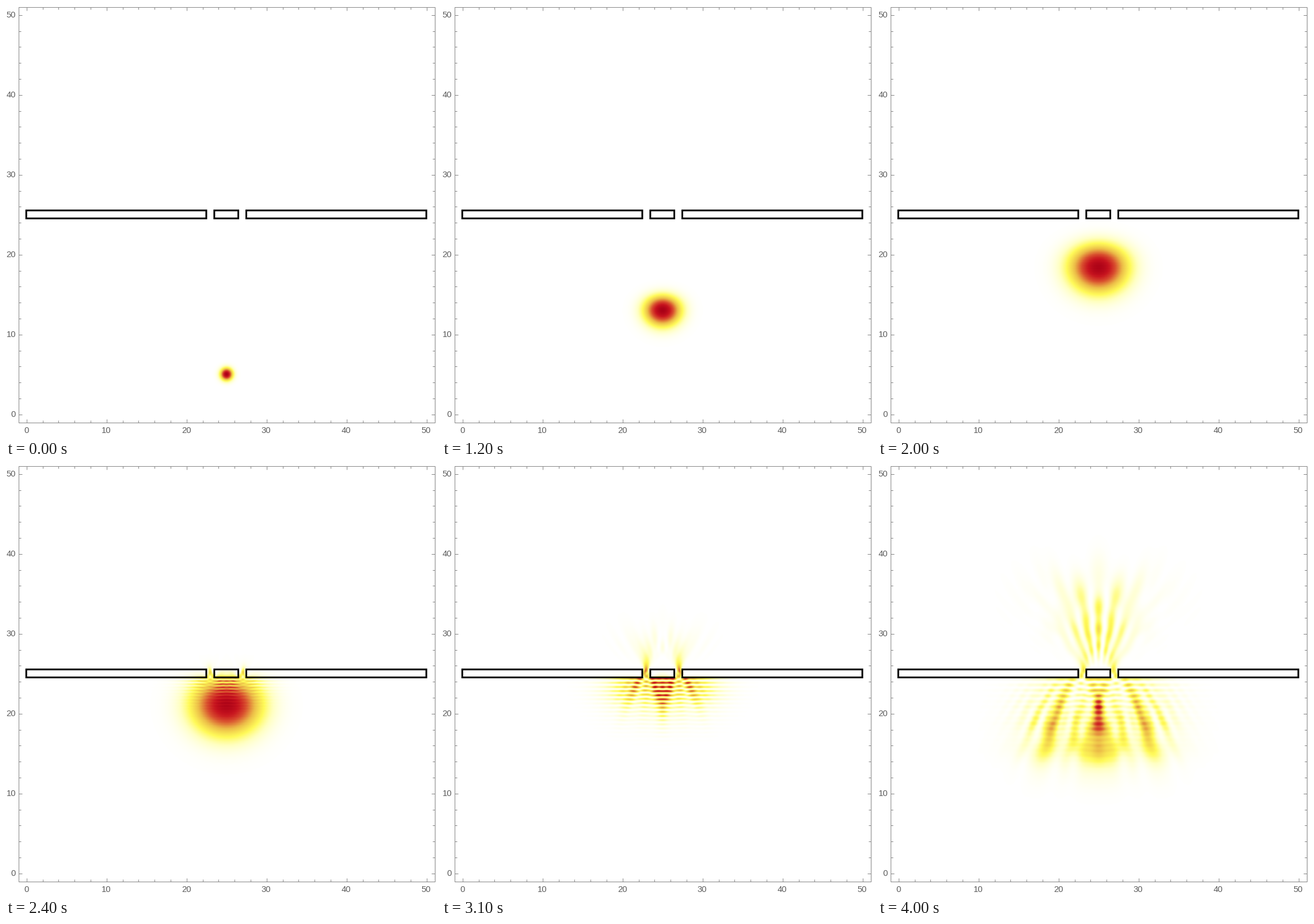
A matplotlib script that plays this animation: 747 by 750 pixels, repeating every 4.1 s.

```python
import numpy as np
import matplotlib.pyplot as plt
from matplotlib.animation import FuncAnimation
from matplotlib.colors import LinearSegmentedColormap
from matplotlib.patches import Rectangle

W, H, DPI = 747, 750, 96
PX = 72 / DPI                      # one pixel in points
FRAMES, INTERVAL = 41, 100

# Lattice and wave packet (hbar = m = 1)
STEP = 0.1
NX, NY, X_MIN = 400, 500, 5.0
SIGMA, K0 = 0.5, 2 * np.pi
FRAME_TIME = 0.1125
SUBSTEPS = 8
FREE_FRAMES = 16                   # the packet is still far from the wall
WALL = 30.0                        # low enough for the fastest part to cross

HEAT = LinearSegmentedColormap.from_list("heat", [
    (0.00, "#ffffff"), (0.10, "#ffffc0"), (0.22, "#fffa58"),
    (0.42, "#ecbc48"), (0.64, "#d9502f"), (0.82, "#c8141f"),
    (1.00, "#a80016")], N=512)


def px(x):
    return 35.2 + 13.9 * x


def py(y):
    return 710.2 - 13.9 * y


def wall_potential():
    off = np.abs(np.arange(NX) - NX // 2)
    solid = ~((off > 15) & (off < 25))
    v = np.zeros((NY, NX))
    v[245:256, solid] = WALL
    return v


def simulate():
    """Split-step evolution; returns the scaled density of every frame."""
    x = X_MIN + STEP * np.arange(NX)
    y = STEP * np.arange(NY)[:, None]
    start = np.exp(-((x - 25) ** 2 + (y - 5) ** 2) / (4 * SIGMA ** 2)
                   + 1j * K0 * y)
    phase_x, phase_y = (2 * np.pi * np.fft.fftfreq(n) for n in (NX, NY))
    kinetic = (2 - np.cos(phase_x) - np.cos(phase_y)[:, None]) / STEP ** 2

    dt = FRAME_TIME / SUBSTEPS
    drift = np.exp(-1j * kinetic * dt)
    half_kick = np.exp(-0.5j * wall_potential() * dt)
    kick = half_kick ** 2
    spectrum = np.fft.fft2(start)
    rows = (-1.0) ** np.arange(NY)[:, None]

    result = []
    psi = start
    for i in range(FRAMES):
        if 0 < i <= FREE_FRAMES:
            psi = np.fft.ifft2(spectrum * np.exp(-1j * kinetic * FRAME_TIME * i))
        elif i > FREE_FRAMES:
            psi = psi * half_kick
            for n in range(SUBSTEPS):
                psi = np.fft.ifft2(np.fft.fft2(psi) * drift)
                psi *= kick if n < SUBSTEPS - 1 else half_kick
        rho = psi.real ** 2 + psi.imag ** 2
        # fine lattice stripes that build up with time
        rho *= 1 + 0.05 * np.clip((i - 8) / 16, 0, 1) * rows
        result.append((rho / rho.max()).astype(np.float32))
    return result


def draw_axes(ax):
    left, right, top, bottom = 21.5, 744.5, 1.5, 724.5
    style = dict(color="#868686", lw=PX, solid_capstyle="butt", zorder=3)
    ax.plot([left, right, right, left, left],
            [top, top, bottom, bottom, top], **style)
    for v in range(0, 51, 2):
        size = 6 if v % 10 == 0 else 4
        x, y = int(px(v)) + 0.5, int(py(v)) + 0.5
        for edge, d in ((bottom, -size), (top, size)):
            ax.plot([x, x], [edge, edge + d], **style)
        for edge, d in ((left, size), (right, -size)):
            ax.plot([edge, edge + d], [y, y], **style)
    text = dict(color="#5c5c5c", fontsize=14.8 * PX, family="Liberation Sans",
                va="baseline")
    for v in range(0, 51, 10):
        ax.text(px(v), 743, str(v), ha="center", **text)
        ax.text(17, py(v) + 4.5, str(v), ha="right", **text)


def draw_walls(ax):
    for a, b in ((0, 22.5), (23.5, 26.5), (27.5, 50)):
        ax.add_patch(Rectangle((px(a), py(25.5)), px(b) - px(a), 13.9,
                               fill=False, ec="black", lw=3 * PX,
                               joinstyle="miter", snap=False, zorder=4))


density = simulate()

fig = plt.figure(figsize=(W / DPI, H / DPI), dpi=DPI, facecolor="white")
ax = fig.add_axes([0, 0, 1, 1])
ax.axis("off")

x0, y0 = X_MIN - STEP / 2, -STEP / 2
image = ax.imshow(density[0], cmap=HEAT, vmin=0, vmax=1, origin="lower",
                  extent=(px(x0), px(x0 + NX * STEP), py(y0), py(y0 + NY * STEP)),
                  interpolation="bilinear", aspect="auto", zorder=1)
draw_axes(ax)
draw_walls(ax)
ax.set_xlim(0, W)
ax.set_ylim(H, 0)


def update(i):
    image.set_data(density[i])
    return (image,)


anim = FuncAnimation(fig, update, frames=FRAMES, interval=INTERVAL,
                     repeat=True, repeat_delay=0, blit=False)
plt.show()
```
